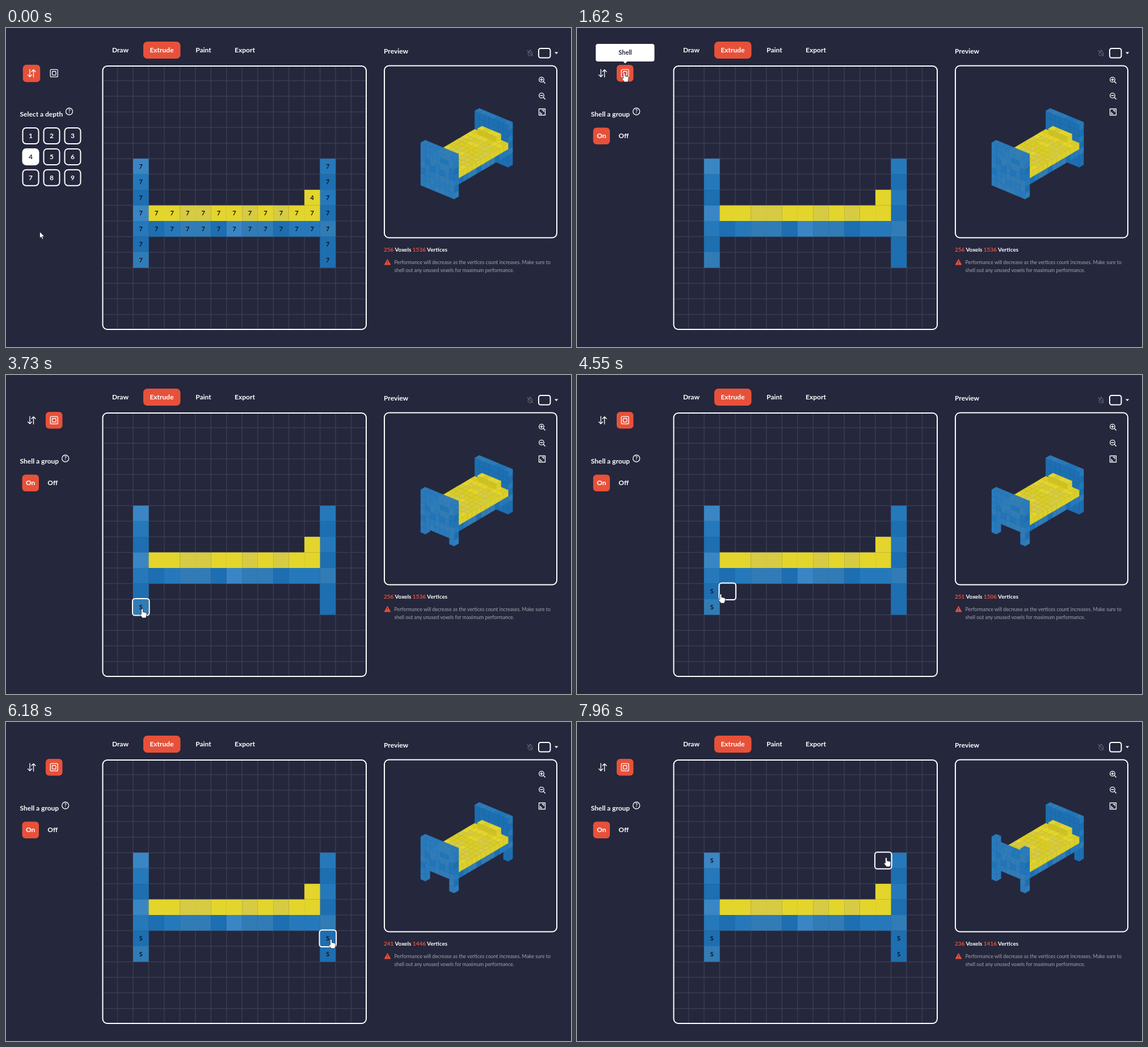
Write an HTML page that moves like this. It is 996x562 px and loops after 8 s.

```html
<!DOCTYPE html>
<html lang="en">
<head>
<meta charset="utf-8">
<title>Voxel editor</title>
<style>
  html, body { margin: 0; width: 100%; height: 100%; overflow: hidden; background: #25273c; }
  svg { display: block; width: 996px; height: 562px; }
  text { font: 700 12px Lato, "Open Sans", sans-serif; fill: #fff; }
  .mid { text-anchor: middle; }
  .num { font-size: 11px; fill: #11131c; text-anchor: middle; }
  .count { font-size: 10px; }
  .note { font-size: 8.8px; font-weight: 400; fill: #a3a4ae; }
  .red { fill: #e7513a; }
  .line { fill: none; stroke: #fff; stroke-width: 1.3; stroke-linecap: round; stroke-linejoin: round; }
  .box { fill: none; stroke: #fff; stroke-width: 2; }
</style>
</head>
<body>
<svg viewBox="0 0 996 562">
  <defs>
    <g id="help">
      <circle class="line" r="6" stroke-width="1"/>
      <text class="mid" y="3.3" style="font-size:9px">?</text>
    </g>
    <g id="lens">
      <circle class="line" cx="-1" cy="-1" r="4.3"/>
      <path class="line" d="M2.3 2.3L5.3 5.3M-3-1H1"/>
    </g>
  </defs>

  <!-- tabs -->
  <rect class="red" x="242" y="24" width="65.500" height="30" rx="7"/>
  <text class="mid" x="201.500" y="43">Draw</text>
  <text class="mid" x="274.500" y="43">Extrude</text>
  <text class="mid" x="348" y="43">Paint</text>
  <text class="mid" x="421" y="43">Export</text>

  <!-- board -->
  <path id="lines" stroke="#3a3c51" stroke-width="1.500"/>
  <g id="cells"></g>
  <rect class="box" x="170.500" y="67" width="464.500" height="464" rx="8" stroke-width="2.400"/>
  <g id="depths"></g>
  <g id="shells"></g>
  <rect id="mark" class="box" width="29.600" height="29.600" rx="4.500"/>

  <!-- preview -->
  <text x="666" y="44.500">Preview</text>
  <g fill="none" stroke="#5d5f70" stroke-width="1.200">
    <path d="M924 39c-2.600 3-3.800 4.800-3.800 6.500a3.800 3.600 0 0 0 7.600 0c0-1.700-1.200-3.500-3.800-6.500zM918.500 39.500l10 9.500"/>
  </g>
  <rect class="box" x="939" y="36" width="20.500" height="16.500" rx="3.500"/>
  <path d="M967 42.500h6.400l-3.200 3.600z" fill="#fff"/>
  <rect class="box" x="667" y="66.500" width="304" height="303" rx="8"/>
  <use href="#lens" x="945" y="92"/><path class="line" d="M944 89v4"/>
  <use href="#lens" x="945" y="120"/>
  <path class="line" d="M939.500 142.500h11v11h-11zM942 148.500v2.500h2.500M945.500 145H948v2.500"/>
  <g id="model"></g>
  <text class="count" x="666" y="393.500"><tspan id="vox" class="red"></tspan> Voxels <tspan id="vert" class="red"></tspan> Vertices</text>
  <path class="red" d="M672.500 407.500l5.300 9.500h-10.600z" stroke="#e7513a" stroke-linejoin="round"/>
  <path d="M672.500 410.500v3M672.500 415v1" stroke="#25273c" stroke-width="1.100"/>
  <text class="note" x="684.500" y="415.500">Performance will decrease as the vertices count increases. Make sure to</text>
  <text class="note" x="684.500" y="429.500">shell out any unused voxels for maximum performance.</text>

  <!-- tools -->
  <rect id="toolA" class="red"/>
  <path class="line" stroke-width="1.700" d="M42 73v13M38.500 82.500L42 86l3.500-3.500M48.500 86.500v-13M45 77l3.500-3.500L52 77"/>
  <rect id="toolB" class="red"/>
  <rect class="line" x="78.200" y="73.200" width="13" height="13" rx="2"/>
  <rect class="line" x="81.500" y="76.500" width="6.400" height="6.400" rx="1"/>

  <g id="depthPanel">
    <text x="24.500" y="155.500">Select a depth</text>
    <use href="#help" x="111.500" y="147"/>
    <g id="pads"></g>
  </g>
  <g id="shellPanel">
    <text x="24.500" y="155.500">Shell a group</text>
    <use href="#help" x="104.700" y="147"/>
    <rect class="red" x="28.500" y="175.500" width="29.500" height="29.500" rx="6"/>
    <text class="mid" x="43.200" y="194">On</text>
    <text class="mid" x="82.200" y="194">Off</text>
  </g>

  <g id="tip">
    <path d="M81 58.500h8l-4 4z" fill="#fff"/>
    <rect x="33" y="28" width="103.500" height="31" rx="4" fill="#fff"/>
    <text class="mid" x="85" y="46.500" style="font-size:11px;fill:#25273c">Shell</text>
  </g>

  <g id="cursor" fill="#fff" stroke="#14151f" stroke-width=".7" stroke-linejoin="round">
    <path id="arrow" d="M0 0v11.300l2.600-2.400 1.900 4.300 1.900-.9-1.900-4.100h3.700z"/>
    <path id="hand" d="M0 0c1 0 1.600.7 1.600 1.600V5.500l4.600 1c1.300.3 2 1.200 1.900 2.500l-.5 3.700L6.500 16H.5l-3.800-5c-.8-1-.4-2 .5-2 .6 0 1 .3 1.300.8V1.600C-1.500.7-1 0 0 0z"/>
  </g>
</svg>

<script>
const LOOP = 8000, CELL = 27.46, X0 = 169.1, Y0 = 65.4, CLICK = 1150, SWAP = 1300;
const $ = id => document.getElementById(id);
const colX = c => X0 + c * CELL, rowY = r => Y0 + r * CELL;
const set = (el, o) => { for (const k in o) el.setAttribute(k, o[k]); };
const show = (el, on) => { el.style.display = on ? '' : 'none'; };
const ramp = (t, a, b) => Math.min(1, Math.max(0, (t - a) / (b - a)));
const ease = p => p * p * (3 - 2 * p);

// Colours 0-3 are blues, 4-6 yellows.
const PAL = ['#3a86c4', '#2579bb', '#1d6fb1', '#317cb6', '#e3d52c', '#d6cb42', '#d9cc27'];
const cells = [];
const addRun = (s, c, r, dc, dr) =>
  [...s].forEach((k, i) => cells.push({ c: c + i * dc, r: r + i * dr, k: +k, d: 7 }));
addRun('0120123', 2, 6, 0, 1);
addRun('1212322', 14, 6, 0, 1);
addRun('44554454544', 3, 9, 1, 0);
addRun('21332033211', 3, 10, 1, 0);
cells.push({ c: 13, r: 8, k: 4, d: 4 });

const label = (c, r, s) =>
  `<text class="num" x="${colX(c + .5)}" y="${rowY(r + .5) + 4}">${s}</text>`;

let d = '';
for (let i = 1; i < 17; i++) d += `M${colX(i)} 67V531M171 ${rowY(i)}H635`;
$('lines').setAttribute('d', d);
$('cells').innerHTML = cells.map(({ c, r, k }) =>
  `<rect x="${colX(c)}" y="${rowY(r)}" width="${CELL + .1}" height="${CELL + .1}" fill="${PAL[k]}"/>`).join('');
$('depths').innerHTML = cells.map(q => label(q.c, q.r, q.d)).join('');

let pads = '';
for (let i = 0; i < 9; i++) {
  const x = 29.5 + i % 3 * 37, y = 176 + Math.floor(i / 3) * 36.9, on = i === 3;
  pads += `<rect class="box" x="${x}" y="${y}" width="28" height="28" rx="6"${on ? ' style="fill:#fff"' : ''}/>` +
    `<text class="mid" x="${x + 14}" y="${y + 18.2}"${on ? ' style="fill:#25273c"' : ''}>${i + 1}</text>`;
}
$('pads').innerHTML = pads;

// Shelled cells: time, column, row
const shells = [[3700, 2, 12], [3950, 2, 11], [5330, 14, 12], [5650, 14, 11], [6900, 2, 6]];

// Voxel axes: l along the bed, w across, h up
const point = (l, w, h) =>
  (731 + 7.94 * l + 8.43 * w).toFixed(1) + ',' + (277 - 4.67 * l + 3.5 * w - 10.7 * h).toFixed(1);
const noise = (l, w, h) => {
  const v = Math.sin(l * 12.99 + w * 78.23 + h * 37.72) * 43758.5;
  return v - Math.floor(v);
};
const face = (fill, ...pts) =>
  `<polygon points="${pts.map(p => point(...p)).join(' ')}" fill="${fill}" stroke="${fill}" stroke-width=".4"/>`;

function drawModel(n) {
  const hollow = new Set(shells.slice(0, n).map(s => s[1] + ',' + s[2]));
  const vox = [], used = new Set();
  for (const { c, r, k, d } of cells)
    for (let i = 0; i < d; i++) {
      if (hollow.has(c + ',' + r) && i > 0 && i < d - 1) continue;
      const v = { l: c - 2, w: (7 - d) / 2 + i, h: 12 - r, k, side: i === d - 1 };
      vox.push(v);
      used.add([v.l, v.w, v.h].join());
    }
  vox.sort((a, b) => b.l - a.l || a.h - b.h || a.w - b.w);
  let out = '';
  for (const { l, w, h, k, side } of vox) {
    const has = (a, b, c) => used.has([l + a, w + b, h + c].join());
    const q = noise(l, w, h);
    const fill = k > 3 ? PAL[4 + Math.floor(q * 3)] : ['#2a7abb', '#317cb6', '#2175b7', '#2a7abb'][Math.floor(q * 4)];
    const front = k > 3 ? '#cdc124' : l === 12 ? '#1d6fb1' : fill;
    const right = k > 3 ? '#dccf2b' : side && k ? PAL[k] : fill;
    if (!has(-1, 0, 0)) out += face(front, [l, w, h], [l, w + 1, h], [l, w + 1, h + 1], [l, w, h + 1]);
    if (!has(0, 1, 0)) out += face(right, [l, w + 1, h], [l + 1, w + 1, h], [l + 1, w + 1, h + 1], [l, w + 1, h + 1]);
    if (!has(0, 0, 1)) out += face(fill, [l, w, h + 1], [l, w + 1, h + 1], [l + 1, w + 1, h + 1], [l + 1, w, h + 1]);
  }
  $('model').innerHTML = out;
  $('shells').innerHTML = shells.slice(0, n).map(s => label(s[1], s[2], 'S')).join('');
  // the counter runs one click behind
  const count = 256 - 5 * Math.max(0, n - 1);
  $('vox').textContent = count;
  $('vert').textContent = count * 6;
}

// Pointer moves: start, end, x, y, optional curve control point
const moves = [
  [210, 1010, 83, 79, 150, 200],
  [1750, 2250, 50, 200],
  [2650, 3390, 242, 432],
  [3610, 3700, 240, 412],
  [3810, 3940, 240, 384],
  [4490, 5000, 576, 437],
  [5180, 5310, 573, 410],
  [5480, 5640, 573, 383],
  [6180, 6740, 223, 236],
  [6840, 6900, 234, 240],
  [6910, 6960, 258, 240],
  [7140, 7480, 521, 240],
  [7730, 7950, 545, 239]
];

function pointer(t) {
  let x = 59.5, y = 359;
  for (const [a, b, ex, ey, cx = (x + ex) / 2, cy = (y + ey) / 2] of moves) {
    if (t <= a) break;
    const p = ease(ramp(t, a, b)), o = 1 - p;
    x = o * o * x + 2 * o * p * cx + p * p * ex;
    y = o * o * y + 2 * o * p * cy + p * p * ey;
  }
  return [x, y];
}

const inside = (x, y, l, t, w, h) => x >= l && x < l + w && y >= t && y < t + h;

function clickable(x, y, shell) {
  if (inside(x, y, 30, 65, 30, 30) || inside(x, y, 70, 65, 30, 30) || inside(x, y, 170, 66, 466, 466)) return true;
  if (shell) return inside(x, y, 28, 175, 30, 30) || inside(x, y, 67, 175, 30, 30);
  return inside(x, y, 29, 175, 104, 104) && (x - 29) % 37 < 30 && (y - 175) % 37 < 30;
}

function square(el, cx, cy, size, alpha) {
  set(el, { x: cx - size / 2, y: cy - size / 2, width: size, height: size, rx: size / 5, opacity: alpha });
}

let drawn = -1;
function frame(t) {
  const shell = t >= SWAP;
  const n = shells.filter(s => t >= s[0]).length;
  if (n !== drawn) drawModel(drawn = n);

  show($('depths'), t < CLICK);
  show($('depthPanel'), !shell);
  show($('shellPanel'), shell);
  const shift = 6 * (ramp(t, CLICK, 1230) - ramp(t, 1270, 1420));
  for (const id of ['depthPanel', 'shellPanel']) set($(id), { transform: `translate(0 ${shift})` });

  square($('toolA'), 45, 80, 30.5 - 12 * ramp(t, CLICK, 1230), 1 - ramp(t, 1270, 1350));
  square($('toolB'), 84.7, 79.8, 16 + 13.5 * ramp(t, 1260, 1420), ramp(t, CLICK, 1230));
  set($('tip'), { opacity: ramp(t, 1070, 1340) - ramp(t, 1860, 1960) });

  const [x, y] = pointer(t);
  const hot = clickable(x, y, shell);
  set($('cursor'), { transform: `translate(${x} ${y})` });
  show($('hand'), hot);
  show($('arrow'), !hot);

  const c = Math.floor((x - X0) / CELL), r = Math.floor((y - Y0) / CELL);
  show($('mark'), c >= 0 && c < 17 && r >= 0 && r < 17);
  set($('mark'), { x: colX(c) - 1, y: rowY(r) - 1 });
}

const start = performance.now();
(function tick() {
  frame((performance.now() - start) % LOOP);
  requestAnimationFrame(tick);
})();
</script>
</body>
</html>
```
